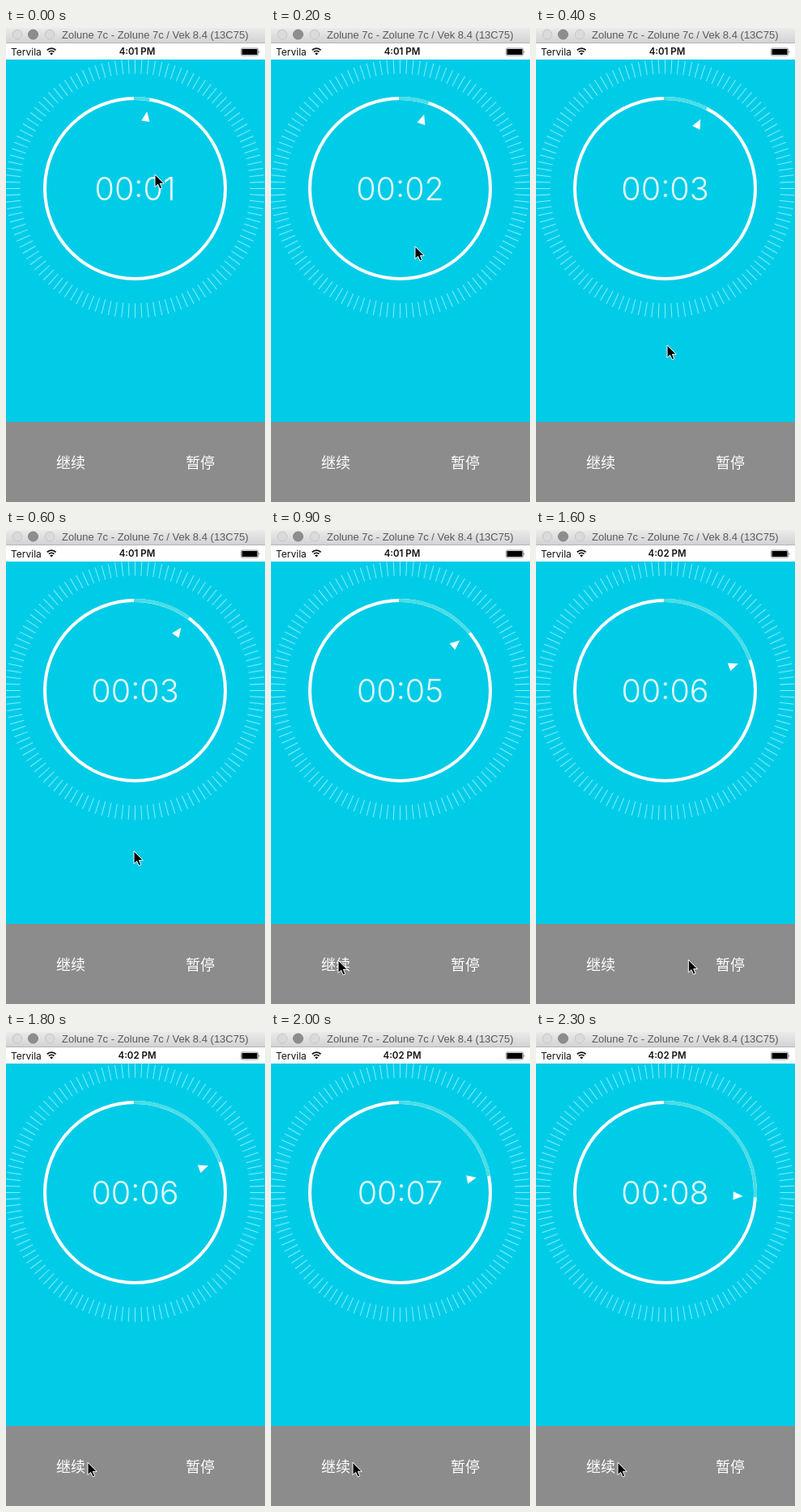
An HTML page that plays this animation: 320x586 px, repeating every 2400 ms.

```html
<!DOCTYPE html>
<html lang="zh-CN">
<head>
<meta charset="utf-8">
<title>Timer</title>
<style>
  html, body { margin: 0; width: 100%; height: 100%; overflow: hidden; background: #00cce8; }
  svg { display: block; width: 320px; height: 586px; }
  text { font-family: Inter, Roboto, sans-serif; }
  .title { font: 13px "Liberation Sans", Arial, sans-serif; fill: #5a5a5a; }
  .status { font-size: 12px; fill: #111; }
  .clock { font-size: 11.5px; font-weight: 600; text-anchor: middle; }
  .count { font-size: 39.5px; font-weight: 300; fill: #e4fafd; text-anchor: middle; }
  .button { font: 300 18px "Noto Sans CJK SC", "Noto Sans CJK", sans-serif; fill: #fff; text-anchor: middle; }
</style>
</head>
<body>
<svg viewBox="0 0 320 586">
  <defs>
    <linearGradient id="bar" x2="0" y2="1">
      <stop stop-color="#ebebeb"/><stop offset="1" stop-color="#d3d3d3"/>
    </linearGradient>
  </defs>

  <rect width="320" height="586" fill="#00cce8"/>
  <rect width="320" height="18" fill="url(#bar)"/>
  <rect y="18" width="320" height="1" fill="#b5b5b5"/>
  <g fill="#dadada" stroke="#c6c6c6">
    <circle cx="14" cy="8" r="5.8"/>
    <circle cx="33.5" cy="8" r="6" fill="#8d8d8d" stroke="#848484"/>
    <circle cx="54" cy="8" r="5.8"/>
  </g>
  <text class="title" x="69" y="13">Zolune 7c - Zolune 7c / Vek 8.4 (13C75)</text>

  <rect y="19" width="320" height="20" fill="#fff"/>
  <text class="status" x="6" y="33.5">Tervila</text>
  <g fill="none" stroke="#111" stroke-width="1.8">
    <path d="M50.8 27.4A7.6 7.6 0 0 1 61.6 27.4M52.9 29.7A4.7 4.7 0 0 1 59.5 29.7"/>
    <path d="M54.2 31.4A2.8 2.8 0 0 1 58.2 31.4L56.2 33.6Z" fill="#111" stroke="none"/>
  </g>
  <text class="status clock" id="clock" x="162" y="33.2"></text>
  <rect x="290.5" y="25" width="21" height="9" rx="1.5" fill="#fff" stroke="#777" stroke-width=".8"/>
  <rect x="291.5" y="26" width="19" height="7" rx=".6"/>
  <path d="M312.6 27.8q1.6 1.7 0 3.4z" fill="#333"/>

  <g transform="translate(159.5 198.5)" fill="none">
    <circle r="151" stroke="#84edf8" stroke-width="18" pathLength="120"
            stroke-dasharray=".13 .87" stroke-dashoffset=".065"/>
    <circle r="111.5" stroke="#fff" stroke-width="4"/>
    <circle id="arc" r="111.5" stroke="#48dde6" stroke-width="4" pathLength="360" transform="rotate(-90.8)"/>
    <path id="hand" d="M0-96.3L5.2-84.3H-5.2Z" fill="#fff"/>
  </g>
  <text class="count" id="count" x="159.5" y="213"></text>

  <rect y="487" width="320" height="99" fill="#8c8c8c"/>
  <text class="button" x="80" y="544">继续</text>
  <text class="button" x="240" y="544">暂停</text>

  <path id="cursor" d="M0 0V15.6L3.6 12.3L6.2 18L8.8 16.9L6.4 11.3H11.2Z"
        stroke="#fff" stroke-width="1" stroke-linejoin="round"/>
</svg>
<script>
  const LOOP = 2400, STEP = 100;
  const PAUSE = 1335, RESUME = 1800;
  const START = 8.8, SPEED = 0.0457;   // degrees, degrees per ms
  const $ = id => document.getElementById(id);

  // time, x, y
  const path = [
    [0, 184, 181], [100, 184, 195], [200, 178, 270], [300, 166, 360],
    [400, 162, 392], [600, 158, 397], [700, 130, 450], [800, 95, 520],
    [900, 83, 532], [1000, 92, 533], [1200, 203, 535], [1400, 232, 531],
    [1500, 232, 531], [1800, 101, 532], [LOOP, 101, 532]
  ];

  function cursorAt(t) {
    const i = path.findIndex(p => p[0] > t);
    const [t0, x0, y0] = path[i - 1], [t1, x1, y1] = path[i];
    const k = (t - t0) / (t1 - t0);
    return [x0 + (x1 - x0) * k, y0 + (y1 - y0) * k];
  }

  function draw(t) {
    const running = Math.min(t, PAUSE) + Math.max(0, t - RESUME);
    const angle = START + SPEED * running;
    const seconds = Math.ceil(angle / 12 - 0.1);
    $('arc').setAttribute('stroke-dasharray', `${angle + 1.2} 360`);
    $('hand').setAttribute('transform', `rotate(${angle})`);
    $('count').textContent = '00:' + String(seconds).padStart(2, '0');
    $('clock').textContent = t < 1600 ? '4:01 PM' : '4:02 PM';
    $('cursor').setAttribute('transform', `translate(${cursorAt(t)})`);
  }

  const origin = performance.now();
  function tick() {
    const t = (performance.now() - origin) % LOOP;
    draw(Math.floor(t / STEP) * STEP);
    requestAnimationFrame(tick);
  }
  tick();
</script>
</body>
</html>
```
